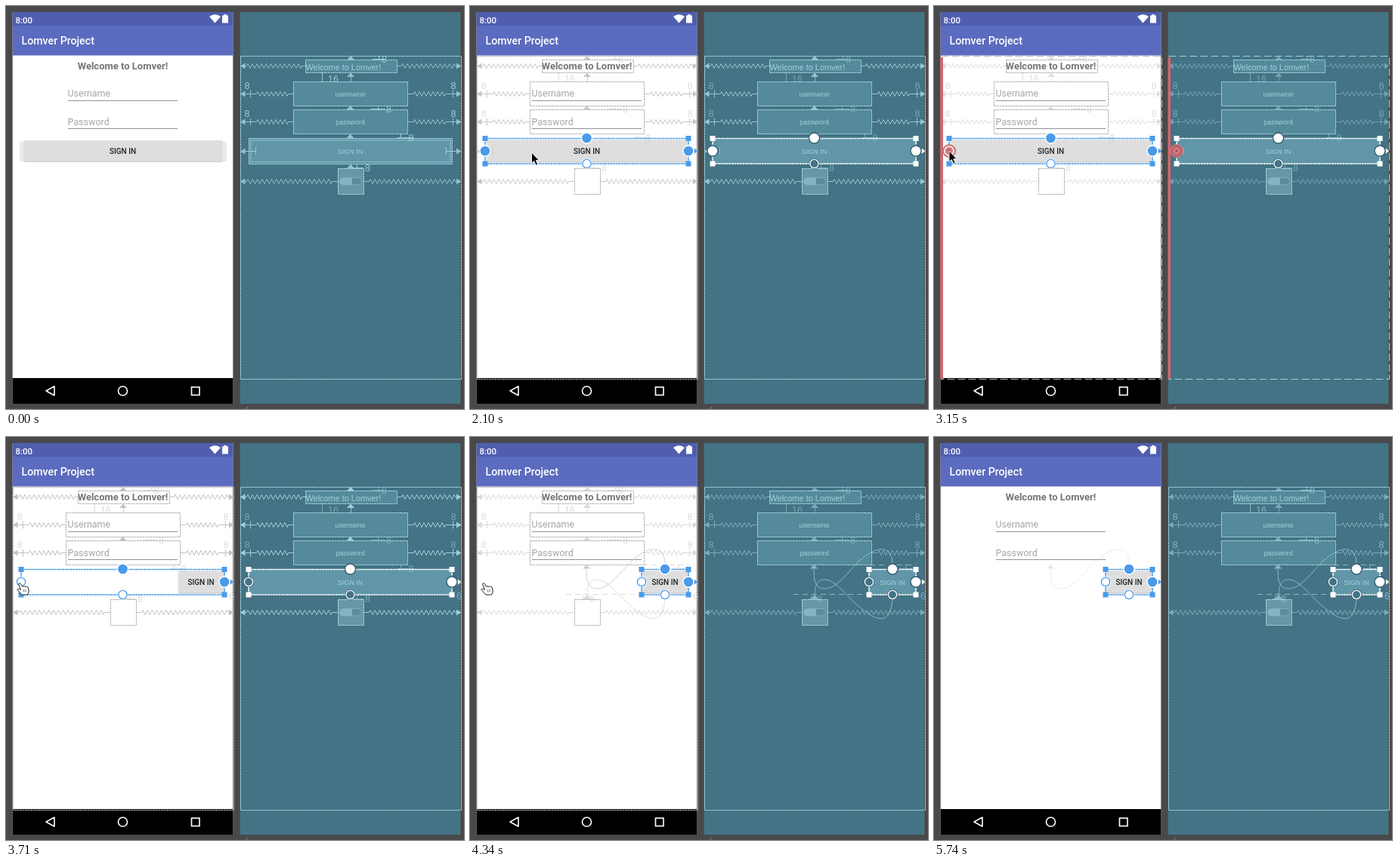
An HTML page that plays this animation: 606 px wide and 534 px high, repeating every 5810 ms.

```html
<!DOCTYPE html>
<html lang="en">
<head>
<meta charset="utf-8">
<title>Layout editor</title>
<style>
html, body { margin: 0; width: 100%; height: 100%; overflow: hidden; background: #49494c; }
svg { display: block; width: 606px; height: 534px; }
.app { font-family: Roboto, sans-serif; }
.plan { font-family: "Liberation Sans", Arial, sans-serif; }
</style>
</head>
<body>
<svg id="stage" viewBox="0 0 606 534" xmlns="http://www.w3.org/2000/svg"></svg>
<script>
const LOOP = 5810, STEP = 70, SHIFT = 301;
const stage = document.getElementById('stage');

// Piecewise linear value at time t through [time, value] pairs.
function track(t, ...keys) {
  if (t <= keys[0][0]) return keys[0][1];
  for (let i = 1; i < keys.length; i++) {
    const [a, u] = keys[i - 1], [b, v] = keys[i];
    if (t < b) return u + (v - u) * (t - a) / (b - a);
  }
  return keys[keys.length - 1][1];
}
const ease = p => p * p * (3 - 2 * p);
const rect = (x, y, r, b, attrs) =>
  `<rect x="${x}" y="${y}" width="${r - x}" height="${b - y}" ${attrs}/>`;
const circle = (x, y, r, attrs) => `<circle cx="${x}" cy="${y}" r="${r}" ${attrs}/>`;
const text = (x, y, size, fill, str, attrs = '') =>
  `<text x="${x}" y="${y}" font-size="${size}" fill="${fill}" ${attrs}>${str}</text>`;
const path = (d, attrs = '') => `<path d="${d}" ${attrs}/>`;
const group = (opacity, body, attrs = '') =>
  opacity > 0.01 ? `<g opacity="${opacity.toFixed(3)}" ${attrs}>${body}</g>` : '';
const middle = 'text-anchor="middle"';
const crisp = 'transform="translate(.5 .5)"';

// Spring between two x positions, with straight ends.
function spring(from, to, y, startLead, endLead) {
  let d = `M${from} ${y}H${from + startLead}`;
  const end = to - endLead;
  const count = Math.round((end - from - startLead) / 3.1);
  const step = (end - from - startLead) / count;
  for (let i = 0; i < count; i++)
    d += `L${(from + startLead + (i + .5) * step).toFixed(1)} ${y + (i % 2 ? 3 : -3)}`;
  return d + `L${end} ${y}H${to}`;
}
const arrowLeft = y => `M8.500 ${y}l6.500 -4v8z`;
const arrowRight = y => `M301 ${y}l-6.500 -4v8z`;
const arrowUp = (x, y) => `M${x} ${y}l5 5.500h-10z`;

const springs =
  spring(15, 95, 79, 2, 5) + spring(216, 295, 79, 6, 2) +
  [116, 153].map(y =>
    spring(15, 79, y, 15, 7) + spring(230, 295, y, 8, 15) +
    `M22 ${y - 5}v10M290 ${y - 5}v10`).join('') +
  spring(15, 138, 232, 2, 8) + spring(172, 295, 232, 7, 2);
const sideArrows = [79, 116, 153, 232].map(y => arrowLeft(y) + arrowRight(y)).join('');
const topArrows = arrowUp(154.5, 65.5) + arrowUp(154.5, 88) + arrowUp(154, 131.5);

const upperCurve = 'M258 169C258 143 238 144 218 161C200 176 186 201 168 201C155 201 154 188 154 175';
const lowerCurve = 'M258 209C258 244 243 247 223 232C198 214 184 189 168 189C156 189 155 201 155 214';

const boxes = [[95, 71, 216, 88], [79, 100, 230, 132], [79, 137, 230, 169], [138, 215, 172, 249]];

function background() {
  const plain = 'fill="none" stroke="#fff" stroke-width="1.6"';
  return rect(0, 0, 606, 534, 'fill="#49494c"') +
    rect(8.7, 8, 300.3, 527, 'fill="#fff"') +
    rect(8.7, 8, 300.3, 26, 'fill="#4f5fae"') +
    rect(8.7, 26, 300.3, 65.5, 'fill="#5b6bbf"') +
    rect(8.7, 493, 300.3, 527, 'fill="#000"') +
    rect(309.7, 8, 601.3, 527, 'fill="#437385"') +
    path('M269 14Q276.500 8.500 284 14L276.500 22.500Z', 'fill="#fff"') +
    path('M286 12.500h2.300v-1.500h3.400v1.500h2.300v10h-8z', 'fill="#fff"') +
    path('M53 510L64 504V516Z', plain + ' stroke-linejoin="round"') +
    circle(154.5, 510, 6, plain) +
    rect(245.5, 505, 256, 515.5, plain) +
    path('M317 534l3 -3', 'stroke="#8b8b90"') +
    '<g class="app">' +
    text(12.5, 22.5, 11.5, '#fff', '8:00', 'font-weight="500"') +
    text(20.5, 51, 14.2, '#fff', 'Lomver Project', 'font-weight="500"') +
    text(154.5, 84, 13, '#757575', 'Welcome to Lomver!', 'font-weight="700" ' + middle) +
    text(81.5, 120, 12.5, '#a6a6a6', 'Username') +
    text(81.5, 157.5, 12.5, '#a6a6a6', 'Password') + '</g>' +
    path('M82 125.500H227M82 162.500H227', 'stroke="#939393"');
}

function appButton(t) {
  const wide = t < 3640;
  const left = wide ? 23 : 229, right = wide ? 287 : 288;
  return group(track(t, [70, 1], [490, 0]), rect(18, 180, 292, 206, 'fill="#ebebeb"')) +
    group(track(t, [140, 0], [700, 1]), rect(left - 2, 177, right + 2, 208, 'fill="#e9e9e9"')) +
    rect(left, 179, right, 207, 'rx="2" fill="#cdcdcd"') +
    rect(left, 178, right, 206, 'rx="2" fill="#dedede"') +
    text((left + right) / 2 - .5, 195.5, 10, '#222', 'SIGN IN', `class="app" font-weight="500" ${middle}`);
}

function planWidgets(frameLeft, t) {
  const fill = 'fill="#558a9b"', ink = '#a3d0dc';
  const label = (x, y, str) => text(x, y, 9, ink, str, middle);
  return '<g class="plan">' +
    boxes.map((b, i) => rect(...b, i === 3 ? 'fill="#6798a8"' : fill)).join('') +
    rect(frameLeft, 175, 289, 209, 'fill="#6096a7"') +
    (t < 1400 ? rect(23, 178, 287, 206.5, 'fill="none" stroke="#8fbecb"') : '') +
    text(95.5, 85, 10.9, ink, 'Welcome to Lomver!') +
    label(154.5, 120, 'username') + label(154.5, 157, 'password') +
    label((frameLeft + 289) / 2, 195.5, 'SIGN IN') +
    rect(140.5, 227.5, 170, 237, 'rx="4.700" fill="#5b8d9d" stroke="#7fb0be"') +
    path('M145 228h12v9h-12a4.500 4.500 0 0 1 0 -9z', 'fill="#86b4c1"') + '</g>';
}

// Constraint overlay shared by both panels, in left panel coordinates.
function constraints(t, look, frameLeft) {
  const { ink, edge, lines, margins, frames, curves, lower } = look;
  const narrow = frameLeft > 120, selected = t >= 1400, cut = t >= 3290;
  const dash = 'stroke-dasharray="3 .6"';
  const line = `fill="none" stroke="${ink}"`;
  const num = (x, y, n) => text(x, y, 12.5, ink, n, 'class="plan"');
  const hot = t >= 2800 && t < 3290;

  let wires = path(springs, line) + path(sideArrows + topArrows, `fill="${ink}"`) +
    path('M154 100Q156 97 155 93', line) + path(arrowRight(192), `fill="${ink}"`);
  if (!cut) wires += path(arrowLeft(192), `fill="${ink}"`);
  if (!narrow) wires += path(arrowUp(154, 169) + arrowUp(154.5, 209), `fill="${ink}"`);

  let marks = path('M184 70.500H200M192.500 66V71M113 100.500H122M117.500 88V100' +
    'M182 136.500H201M191.500 132V137', line) +
    num(196, 74.5, '8') + num(125, 101, '16') + num(202, 140.5, '8') +
    [110, 147].map(y => num(14.5, y, '8') + num(287.5, y, '8')).join('');
  if (!narrow) marks += path('M217 174.500H239M221.500 169V175M160 214.500H172M163.500 209V215', line) +
    num(231.5, 178.5, '8') + num(174, 218.5, '8');
  else marks += path('M147 214.500H158M150.500 209V215M268 174.500H284M275.500 169V175', line) + num(158, 218.5, '8');
  if (!selected) marks += path('M15 192.500H29M29.500 187V197M281.500 187V197M281 192.500H295', line);
  else if (!cut) marks += path('M29.500 187V197', line);
  if (cut) marks += num(295, 215, '6');

  const outline = `fill="none" stroke="${edge}" `;
  return group(frames,
      rect(9, 66, 301, 494, outline + (hot ? 'stroke-dasharray="10 4"' : dash)) +
      boxes.map(b => rect(...b, outline + dash)).join('') +
      (selected ? '' : rect(20, 175, 289, 209, `fill="none" stroke="${look.hover}" ${dash}`)), crisp) +
    group(lines, wires, crisp) + group(margins, marks) +
    group(curves, path(upperCurve, line) + path(arrowUp(154, 169), `fill="${ink}"`)) +
    group(lower, path(lowerCurve, line) + path(arrowUp(155, 209), `fill="${ink}"`) +
      path('M127 208.500H228M228 169.500H289', line + ' stroke-dasharray="7 5"'));
}

function selection(t, look, frameLeft) {
  if (t < 1400) return '';
  const { main, hollow, ring } = look;
  const mid = (frameLeft + 289) / 2;
  const filled = (x, y) => circle(x, y, 7, `fill="${main}" stroke="${ring}" stroke-width="1.400"`);
  const open = (x, y) => circle(x, y, 7, `fill="${ring}"`) +
    circle(x, y, 5.6, `fill="${hollow}" stroke="${main}" stroke-width="1.300"`);
  const corner = (x, y) => rect(x - 3.5, y - 3.5, x + 3.5, y + 3.5, `fill="${main}"`);
  const heat = track(t, [2730, 0], [2940, 1], [3280, 1], [3290, 0]);
  const deleteHandle = circle(20, 192, 9, 'fill="#cb7379"') +
    circle(20, 192, 6, `fill="#cf7d82" stroke="${look.hotRing}" stroke-width="1.600"`) +
    path('M18 190l4 4m0 -4l-4 4', 'stroke="#933f49"');
  return rect(frameLeft, 175.5, 289, 209, `fill="none" stroke="${main}" stroke-width="1.600" stroke-dasharray="3 .6"`) +
    corner(frameLeft, 175.5) + corner(289, 175.5) + corner(frameLeft, 209) + corner(289, 209) +
    filled(mid, 175) + open(mid, 209) + filled(289, 192) +
    (t < 3290 ? filled(frameLeft, 192) : open(frameLeft, 192)) +
    path('M297 188.500l4 3.500l-4 3.500z', `fill="${main}"`) +
    group(heat, rect(8.5, 68, 12, 494, 'fill="#d5656d"') + deleteHandle);
}

function pointer(t) {
  if (t < 210 || t > 4900) return '';
  const x = track(t, [210, 140], [490, 100], [840, 85.5], [980, 85.5], [1260, 81.5], [2170, 81.5], [2800, 20], [4550, 20], [4900, 16]);
  const y = track(t, [210, 500], [490, 230], [840, 181], [980, 181], [1260, 194], [2170, 194], [2800, 192], [4550, 192], [4900, -20]);
  const at = `transform="translate(${x.toFixed(1)} ${y.toFixed(1)})"`;
  if (t < 3290)
    return path('M0 0V14.500L3.300 11.500L5.700 17L8.200 16L5.800 10.600H10Z',
      at + ' fill="#000" stroke="#fff" stroke-width=".9"');
  return `<g ${at} fill="#fff" stroke="#222" stroke-linejoin="round">` +
    path('M-3.500 2.500Q-2 .5 -.5 2.500L2 6.500Q3.500 4.800 4.800 6.300Q6.300 5 7.300 6.500Q9 5.800 9.500 8L10.300 13L8.500 17H1L-2.500 13L-5 10.500Q-4.500 8.500 -2.500 9.500L-.5 10.500Z') +
    path('M3 10.500l1 3M5.500 10l.8 3.200', 'fill="none" stroke-width=".7"') + '</g>';
}

function draw(t) {
  const frameLeft = 20 + 207 * ease(track(t, [3920, 0], [4200, 1]));
  const show = track(t, [140, 0], [700, 1], [4600, 1], [5110, 0]);
  const lines = track(t, [0, .85], [700, 1], [2030, .9], [2660, .9], [2940, .5], [3290, .5], [3640, 1], [3920, 1], [4270, .62]);
  const margins = track(t, [0, .95], [1400, .95], [1960, .55], [5390, .55], [5740, .72]);
  const curves = track(t, [4060, 0], [4270, 1]);

  const left = {
    ink: '#c2c2c2', edge: '#b5b5b5', hover: '#8fb1d4',
    lines: lines * show, margins: margins * show, frames: show,
    curves: curves * track(t, [4270, .8], [4600, .8], [5740, .35]),
    lower: curves * show * .55,
    main: '#4a9aea', hollow: '#fff', ring: '#fff', hotRing: '#fff'
  };
  const right = {
    ink: '#a0d0dd', edge: '#a3d1de', hover: '#a3d1de',
    lines, margins, frames: 1, curves: curves * .75, lower: curves * .75,
    main: '#fff', hollow: '#437385', ring: '#355f70', hotRing: '#a9555f'
  };

  scene.innerHTML = appButton(t) +
    constraints(t, left, frameLeft) + selection(t, left, frameLeft) +
    `<g transform="translate(${SHIFT})">` + planWidgets(frameLeft, t) +
    constraints(t, right, frameLeft) + selection(t, right, frameLeft) + '</g>' +
    pointer(t);
}

stage.innerHTML = background() + '<g id="scene"></g>';
const scene = document.getElementById('scene');
const start = performance.now();

function tick() {
  const t = (performance.now() - start) % LOOP;
  draw(Math.floor(t / STEP) * STEP);
  requestAnimationFrame(tick);
}
tick();
</script>
</body>
</html>
```
